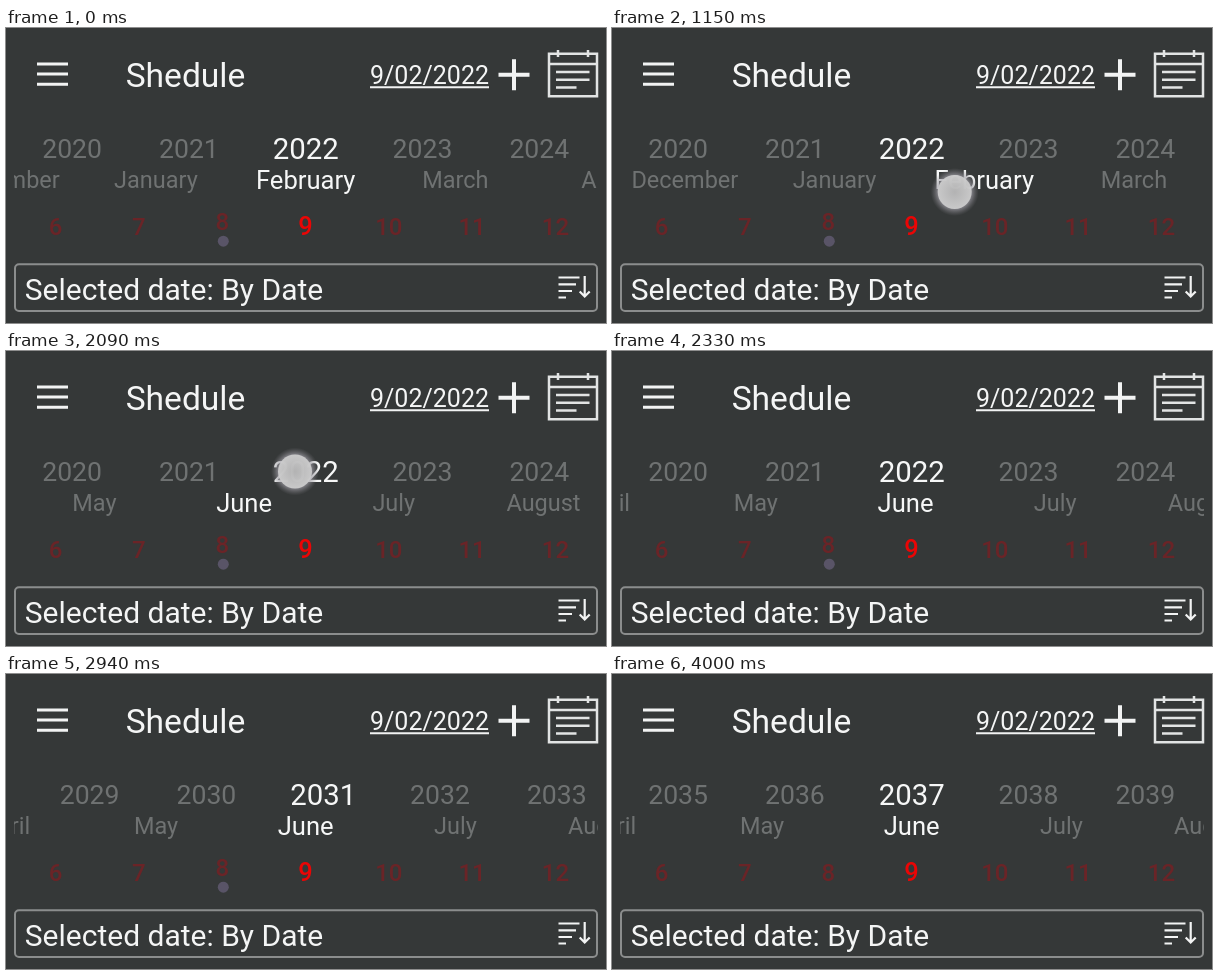
An HTML page that plays this animation: 600x295 px, repeating every 4.61 s.

```html
<!DOCTYPE html>
<html lang="en">
<head>
<meta charset="utf-8">
<title>Schedule picker</title>
<style>
  html, body { margin: 0; width: 100%; height: 100%; overflow: hidden; background: #353838; }
  svg { display: block; width: 100vw; height: 100vh; font-family: Roboto, "Open Sans", sans-serif; }
  text { fill: #f4f5f5; }
  .mid { text-anchor: middle; }
  .line { fill: none; stroke: #f2f3f3; }
</style>
</head>
<body>
<svg id="stage" viewBox="0 0 600 295">
  <defs>
    <clipPath id="rows"><rect x="8" y="80" width="584" height="150"/></clipPath>
    <radialGradient id="glow">
      <stop offset=".68" stop-color="#a4a2aa" stop-opacity=".75"/>
      <stop offset="1" stop-color="#77757b" stop-opacity="0"/>
    </radialGradient>
    <radialGradient id="disc">
      <stop offset="0" stop-color="#b6b6b6"/>
      <stop offset="1" stop-color="#cecece"/>
    </radialGradient>
  </defs>
  <rect width="600" height="295" fill="#353838"/>

  <path class="line" stroke-width="3" d="M31 36H62M31 46H62M31 56.2H62"/>
  <text x="119.7" y="59" font-size="33.6">Shedule</text>
  <text x="364" y="55.7" font-size="25">9/02/2022</text>
  <path class="line" stroke-width="2" d="M364 59.3H483"/>
  <path class="line" stroke-width="4" d="M492.5 46.7H523.5M508 31.2V62.2"/>
  <g class="line" style="stroke:#e2e4e4" stroke-width="2.5">
    <path d="M543 25.7H591V68.3H543ZM543 36H591"/>
    <path d="M552 22V29M582 22V29"/>
    <path d="M550 44H583.5M550 51.7H583.5M550 59.5H570.5"/>
  </g>

  <g id="wheels" clip-path="url(#rows)"></g>
  <g id="days"></g>
  <circle id="dot" cx="217.3" cy="213.2" r="5.5" fill="#595467"/>

  <rect x="9" y="236.3" width="582" height="46.7" rx="4" class="line" style="stroke:#8b8d8d" stroke-width="2"/>
  <text x="18.8" y="272" font-size="30">Selected date: By Date</text>
  <path class="line" stroke-width="2.2" d="M552.5 249.5H573.5M552.5 256.3H570M552.5 263H566M552.5 269.5H560M578.7 248V268M573.7 263.5L578.7 268.5L583.7 263.5"/>

  <g id="touch">
    <circle r="24" fill="url(#glow)"/>
    <circle r="17" fill="url(#disc)" fill-opacity=".92"/>
  </g>
</svg>
<script>
const LOOP = 4610, CENTER = 300;
const MONTHS = ["January", "February", "March", "April", "May", "June", "July",
  "August", "September", "October", "November", "December"];
const $ = id => document.getElementById(id);

function addText(parent, attrs, content = "") {
  const el = document.createElementNS("http://www.w3.org/2000/svg", "text");
  el.setAttribute("class", "mid");
  for (const k in attrs) el.setAttribute(k, attrs[k]);
  el.textContent = content;
  parent.append(el);
  return el;
}

// Monotone cubic curve through [time, value] points, flat at both ends
function curve(pts) {
  const slope = i => (pts[i + 1][1] - pts[i][1]) / (pts[i + 1][0] - pts[i][0]);
  const tangent = pts.map((p, i) => {
    if (i === 0 || i === pts.length - 1) return 0;
    const a = slope(i - 1), b = slope(i);
    return a * b > 0 ? 2 * a * b / (a + b) : 0;
  });
  return t => {
    if (t <= pts[0][0]) return pts[0][1];
    const i = pts.findIndex(p => p[0] > t) - 1;
    if (i < 0) return pts[pts.length - 1][1];
    const [t0, v0] = pts[i], [t1, v1] = pts[i + 1];
    const h = t1 - t0, u = (t - t0) / h, w = 1 - u;
    return v0 * (1 + 2 * u) * w * w + v1 * u * u * (3 - 2 * u)
      + h * (tangent[i] * u * w * w - tangent[i + 1] * u * u * w);
  };
}

const monthShift = curve([[1020, 0], [1150, 72], [1400, 300], [1550, 646.5],
  [1800, 980], [2090, 1138], [2420, 1200]]);
const yearShift = curve([[2540, 0], [2640, 59.7], [2750, 250], [2900, 850],
  [3050, 1480], [3240, 1821], [3580, 1752]]);

// A row of labels whose entry nearest the centre is highlighted
function wheel(count, gap, mid, small, large, label) {
  const slots = Array.from({ length: count }, () => addText($("wheels"), {}));
  return pos => {
    const near = Math.round(pos);
    slots.forEach((el, i) => {
      const n = near + i - (count >> 1), on = n === near;
      const size = on ? large : small;
      el.textContent = label(n);
      el.setAttribute("x", CENTER - 0.3 + (n - pos) * gap);
      el.setAttribute("y", mid + size * 0.3555);
      el.setAttribute("font-size", size);
      el.style.fill = on ? "#f6f7f7" : "#6f7272";
    });
  };
}

const YEAR_GAP = 116.8, MONTH_GAP = 149.7;
const drawYears = wheel(7, YEAR_GAP, 120.9, 26.6, 29.4, n => n);
const drawMonths = wheel(7, MONTH_GAP, 152, 23.5, 25.6, n => MONTHS[(n % 12 + 12) % 12]);

const days = [6, 7, 8, 9, 10, 11, 12].map((d, i) => {
  const on = d === 9;
  return addText($("days"), {
    x: CENTER - 0.5 + (i - 3) * 83.3,
    y: on ? 207 : 206.5,
    "font-size": on ? 25.5 : 24,
    "font-weight": 500,
    style: "fill:" + (on ? "#ea0505" : "#6a2427")
  }, d);
});

const touches = [
  { from: 960, to: 1420, x: t => 270 + monthShift(t), y: curve([[1150, 164], [1420, 154]]) },
  { from: 1990, to: 2300, x: () => 289, y: () => 120.5 },
  { from: 2510, to: 2770, x: t => 345.7 - yearShift(t), y: curve([[2640, 113], [2770, 107]]) }
];

function drawTouch(t) {
  const hit = touches.find(p => t >= p.from && t < p.to);
  const alpha = hit ? Math.min(1, (t - hit.from) / 60, (hit.to - t) / 60) : 0;
  $("touch").setAttribute("opacity", alpha);
  if (hit) $("touch").setAttribute("transform", `translate(${hit.x(t)} ${hit.y(t)})`);
}

function draw(t) {
  drawMonths(1 - monthShift(t) / 150);
  drawYears(2022 + yearShift(t) / YEAR_GAP);
  const marked = t < 4000;
  $("dot").setAttribute("visibility", marked ? "visible" : "hidden");
  days[2].setAttribute("y", marked ? 201.8 : 206.5);
  drawTouch(t);
}

const start = performance.now();
function tick() {
  draw((performance.now() - start) % LOOP);
  requestAnimationFrame(tick);
}
tick();
</script>
</body>
</html>
```
